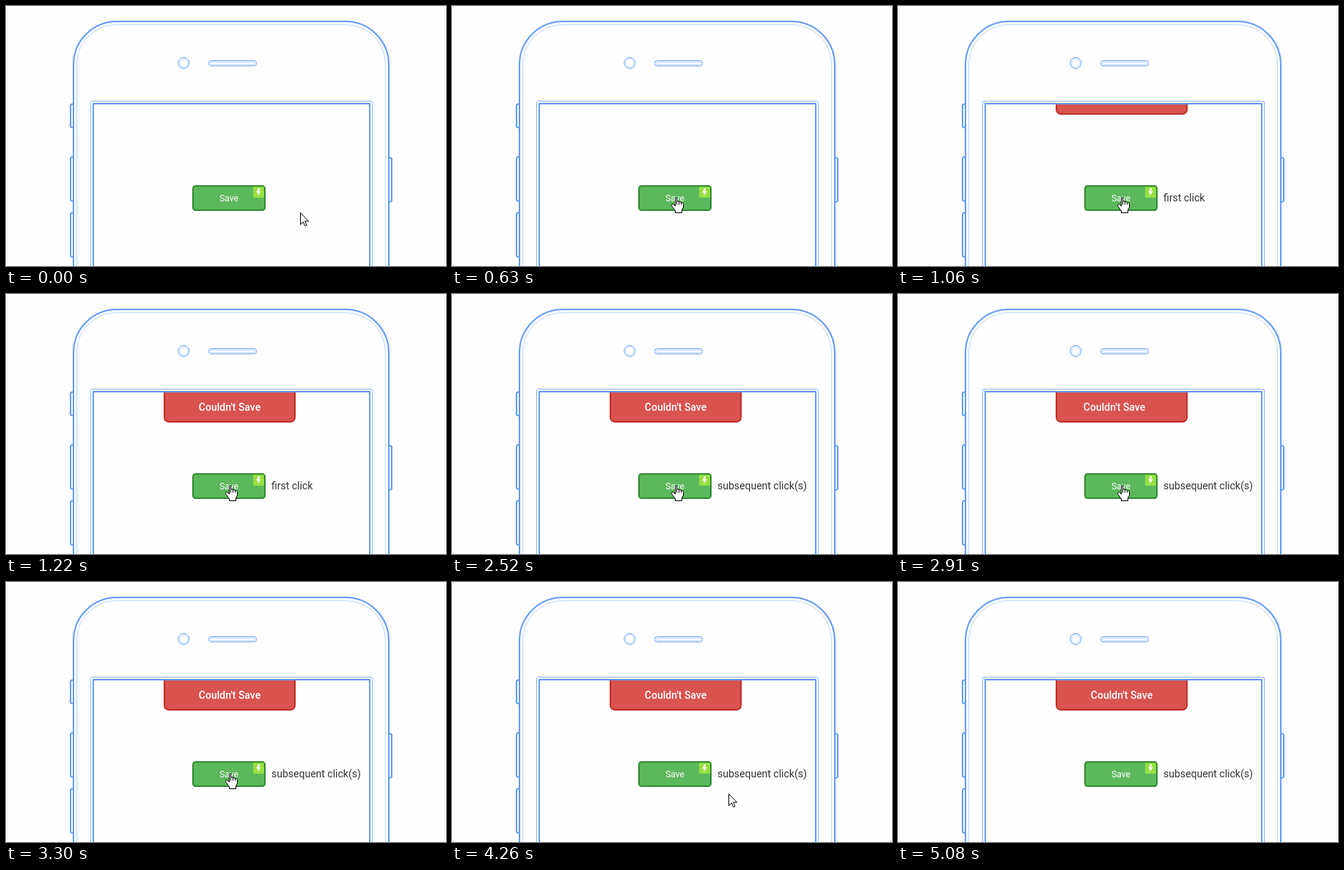
Animation of 600x354 px, one loop 6360 ms. Source, as an HTML page:

```html
<!DOCTYPE html>
<html lang="en">
<head>
<meta charset="utf-8">
<title>Save button error</title>
<style>
  html, body { margin: 0; width: 100%; height: 100%; overflow: hidden; background: #fefefe; }
  svg { display: block; }
  text { font: 14px Roboto, sans-serif; }
  .line { fill: none; stroke: #629bf8; stroke-width: 2; }
  .thin { fill: none; stroke: #629bf8; stroke-width: 1; }
  .pale { fill: none; stroke: #bcd5fb; stroke-width: 1; }
  .white { fill: #fff; }
  .cursor path { fill: #fff; stroke: #000; stroke-width: 1; stroke-linejoin: round; }
  .cursor .fold { fill: none; }
</style>
</head>
<body>
<svg width="600" height="354" viewBox="0 0 600 354">
  <defs>
    <clipPath id="screen"><rect x="120" y="134" width="375" height="220"/></clipPath>
  </defs>

  <g id="phone">
    <path class="line" d="M92 133.500h-1.500q-2.500 0-2.500 2.500v27q0 2.500 2.500 2.500h1.500
      M92 205.500h-1.500q-2.500 0-2.500 2.500v55q0 2.500 2.500 2.500h1.500
      M92 281.500h-1.500q-2.500 0-2.500 2.500v55q0 2.500 2.500 2.500h1.500
      M522 206.500h1.500q2.500 0 2.500 2.500v55q0 2.500-2.500 2.500h-1.500"/>
    <rect class="line" x="92" y="21" width="430" height="420" rx="59"/>
    <rect class="pale" x="96.500" y="25.500" width="421" height="410" rx="54"/>
    <circle class="thin" cx="242.300" cy="77.600" r="7.500"/>
    <circle class="pale" cx="242.300" cy="77.600" r="5.500"/>
    <rect class="thin" x="276.500" y="74.500" width="65" height="7" rx="3"/>
    <rect class="pale" x="278.500" y="76.500" width="61" height="3" rx="1.500"/>
    <rect class="thin" x="115.500" y="129.500" width="384" height="300" rx="2" opacity=".75"/>
    <rect class="line" x="119" y="133" width="377" height="300"/>
  </g>

  <g clip-path="url(#screen)">
    <g id="panel">
      <rect x="216" y="120" width="178" height="54" rx="6" fill="#d9534f" stroke="#c12e2a" stroke-width="2"/>
      <text id="error" class="white" x="305" y="159" text-anchor="middle" font-weight="500" style="font-weight:500">Couldn't Save</text>
    </g>
  </g>

  <g id="button">
    <rect x="255" y="245" width="98" height="33" rx="3.500" fill="#5cb85c" stroke="#2f8a30" stroke-width="2"/>
    <text class="white" x="304" y="266" text-anchor="middle" style="font-size:12px">Save</text>
    <rect x="337" y="246" width="15" height="15" rx="1.500" fill="#93df3f"/>
    <path class="white" d="M344 248l-3 6.300h2.800l-.8 5.200 4.700-7.300h-3l2-4.200z"/>
  </g>
  <text id="note" x="362" y="266" fill="#333"></text>

  <g id="arrow" class="cursor">
    <path d="M.5 .5V16.500L4.200 13L6.800 18.500L9 17.600L6.700 12H11.500Z"/>
  </g>
  <g id="hand" class="cursor" transform="translate(-6 0)">
    <path d="M5.500 12.500V2Q5.500.5 6.500.5T7.500 2V6.500Q7.500 5.500 9 5.500T10.500 7Q10.500 6.500 11.800 6.500T13.500 8
      Q13.500 7.500 14.800 7.500T16.500 9.500V14L14.500 18V21.500H5.500V19L1.500 13.500L.5 11.500Q.5 9.500 2.500 9.800Z"/>
    <path class="fold" d="M7.500 6V10.500M10.500 7V10.500M13.500 8V10.500"/>
  </g>
</svg>
<script>
  const LOOP = 6360;
  const $ = id => document.getElementById(id);
  const [panel, error, note, arrow, hand] = ['panel', 'error', 'note', 'arrow', 'hand'].map($);

  const REST = [401, 281], TARGET = [305, 260], EXIT = [512, 342], GONE = [540, 356];

  // Number of ticks reached, 0 to n, spread evenly from start to end.
  const ticks = (t, start, end, n) =>
    t < start ? 0 : Math.min(n, 1 + Math.floor((t - start) * (n - 1) / (end - start) + 1e-6));
  const ease = p => (1 - Math.cos(Math.PI * p)) / 2;
  const mix = (a, b, p) => a.map((v, i) => Math.round(v + (b[i] - v) * p));
  const move = (el, x, y) => el.setAttribute('transform', `translate(${x} ${y})`);
  const show = (el, on) => el.setAttribute('visibility', on ? 'visible' : 'hidden');

  function pointer(t) {
    if (t < 4080) return mix(REST, TARGET, ease(ticks(t, 250, 630, 8) / 8));
    if (t < 4910) return mix(TARGET, EXIT, ease(ticks(t, 4080, 4600, 10) / 10));
    return mix(EXIT, GONE, ticks(t, 4910, 5080, 4) / 4);
  }

  function draw(t) {
    const slide = ticks(t, 990, 1220, 5) / 5;
    show(panel, slide > 0);
    move(panel, 0, Math.round(-42 * (1 - ease(slide))));

    const beat = Math.max(0, ticks(t, 2520, 3300, 15) - 1);
    move(error, Math.round(10 * Math.sin(beat * Math.PI / 2)), 0);

    note.textContent = t < 990 ? '' : t < 2520 ? 'first click' : 'subsequent click(s)';

    const [x, y] = pointer(t);
    const over = x >= 254 && x < 354 && y >= 244 && y < 279;
    show(hand, over);
    show(arrow, !over);
    move(arrow, x, y);
    move(hand, x - 6, y);
  }

  const start = performance.now();
  function loop() {
    draw((performance.now() - start) % LOOP);
    requestAnimationFrame(loop);
  }
  loop();
</script>
</body>
</html>
```
